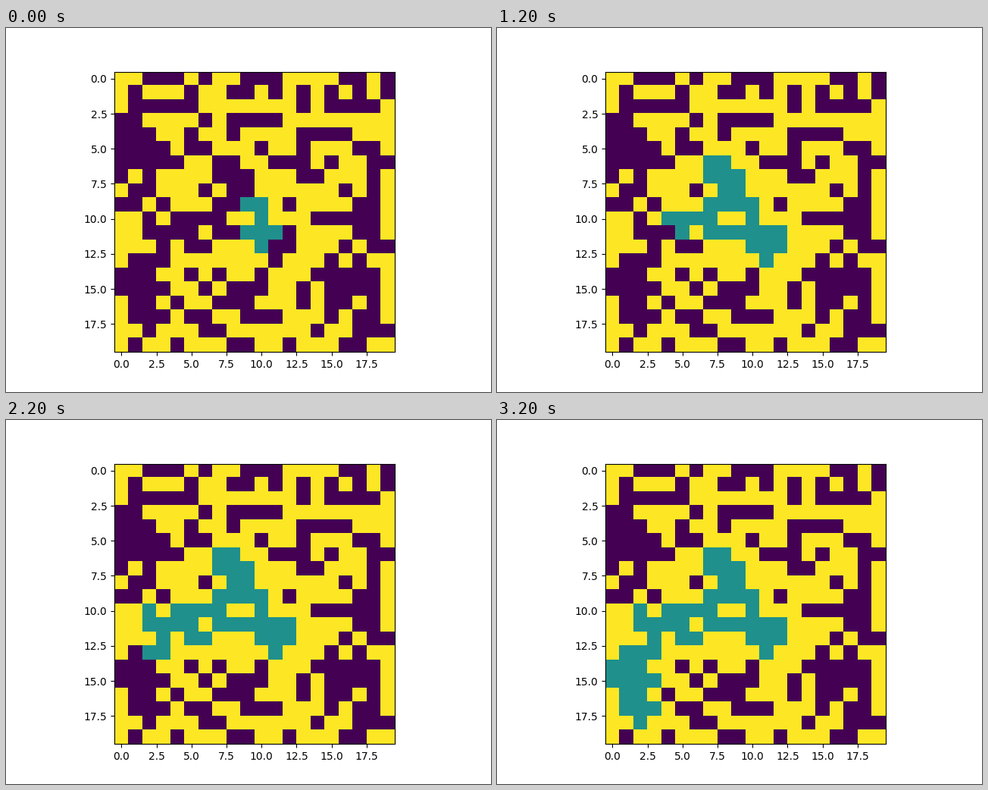
Write a matplotlib script that moves like this. It is 640x480 px and loops after 8 s.

```python
import matplotlib.pyplot as plt
import numpy as np
from matplotlib.animation import FuncAnimation

# '#' is a floor cell, '.' is a wall
MAZE = """
..###.#..###....##.#
.#...#..##.#.#.#.#.#
.#####.......#.####.
##....#.####........
###..#..#....####...
####.##...#..#...##.
#####..##..###.#..##
#.#....###...##...#.
.##...#.##......#.#.
##.#...####.#....##.
..#.####..#...#####.
..####.######....##.
...#.##...###...#.##
.###.......#...#.#..
###..#.#..#...#####.
####..#.###..#.####.
.##.#..###...#.##.#.
.###.##..###...#.##.
..#...##......#..###
.#..#...##..#...##..
""".split()
WALL, FLOOD, FLOOR = 1.0, 0.5, 0.0
START = (10, 10)
HEAD_START = 2
STEP_MS = 200
FRAMES = 40

walls = np.array([[c == "." for c in row] for row in MAZE], dtype=float)


def flood_distance(grid, start):
    """Steps needed to reach each floor cell, infinite if unreachable."""
    dist = np.full(grid.shape, np.inf)
    dist[start] = 0
    queue = [start]
    for r, c in queue:
        for cell in ((r - 1, c), (r + 1, c), (r, c - 1), (r, c + 1)):
            inside = all(0 <= k < n for k, n in zip(cell, grid.shape))
            if inside and grid[cell] == FLOOR and np.isinf(dist[cell]):
                dist[cell] = dist[r, c] + 1
                queue.append(cell)
    return dist


dist = flood_distance(walls, START)


def flooded(step):
    return np.where(dist <= step + HEAD_START, FLOOD, walls)


fig, ax = plt.subplots(figsize=(6.4, 4.8), dpi=100)
image = ax.imshow(flooded(0), cmap="viridis", vmin=FLOOR, vmax=WALL)


def update(step):
    image.set_data(flooded(step))
    return [image]


anim = FuncAnimation(fig, update, frames=FRAMES, interval=STEP_MS,
                     repeat=True, repeat_delay=0)
plt.show()
```
